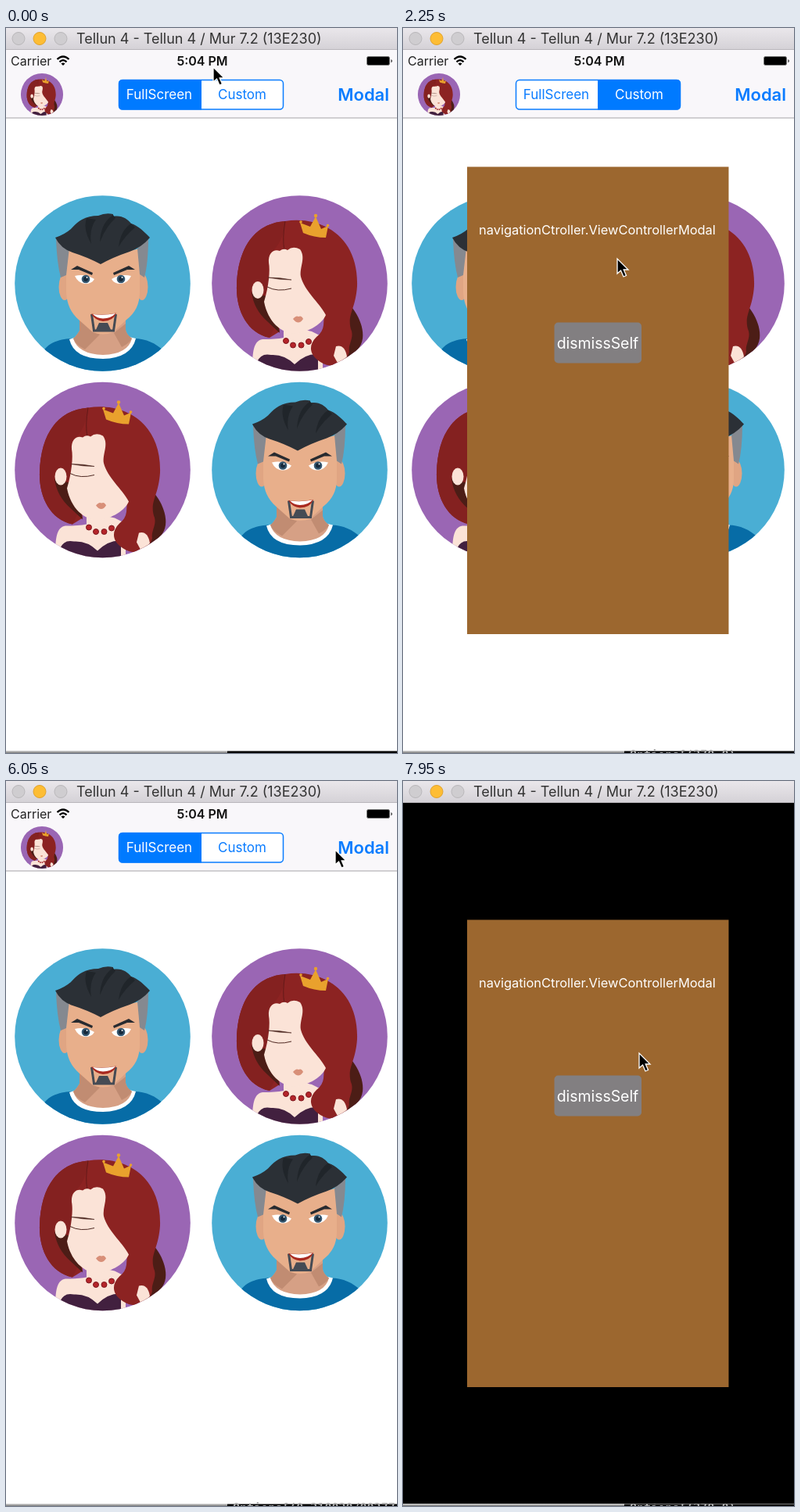
An HTML page for the animation above (8000 ms loop, 500x927 px).

```html
<!DOCTYPE html>
<html lang="en">
<head>
<meta charset="utf-8">
<title>Modal presentation</title>
<style>
html, body { margin: 0; width: 100%; height: 100%; overflow: hidden; background: #fff; }
svg { display: block; width: 100%; height: 100%; }
text { font-family: Inter, Roboto, sans-serif; }
.mid { text-anchor: middle; }
</style>
</head>
<body>
<svg viewBox="0 0 500 927">
  <defs>
    <linearGradient id="chrome" x2="0" y2="1">
      <stop stop-color="#eae7eb"/><stop offset="1" stop-color="#d4d1d6"/>
    </linearGradient>
    <linearGradient id="edge" x2="0" y2="1">
      <stop stop-color="#dedede"/><stop offset="1" stop-color="#777"/>
    </linearGradient>
    <clipPath id="disc"><circle r="112.3"/></clipPath>
    <clipPath id="sheetClip"><rect id="clipRect" y="177.500" height="597.500"/></clipPath>

    <!-- Both portraits are drawn around the centre of their disc. -->
    <g id="man" clip-path="url(#disc)"><g transform="translate(-123.5 -326.5)">
      <rect x="10" y="213" width="228" height="228" fill="#4aaed4"/>
      <path d="M46 416C55 399 75 397 88 397H160C178 396 191 403 201 412V440H46Z" fill="#076ca6"/>
      <path d="M81 398Q87 423 124 423Q160 422 166 397L153 394H94Z" fill="#fff"/>
      <path d="M94 365V387Q90 394 86 397Q92 417 124 418Q156 417 161 397Q154 392 153 386V365Z" fill="#d6a085"/>
      <path d="M94 372V387Q90 394 86 397Q89 405 101 411L120 392Z" fill="#c18c72"/>
      <path d="M153 378L138 390L148 408Q158 403 161 397Q154 392 153 386Z" fill="#c18c72"/>
      <ellipse cx="75" cy="331" rx="7.5" ry="17" fill="#e0a583"/>
      <ellipse cx="174" cy="331" rx="7.5" ry="17" fill="#e0a583"/>
      <path d="M77 282V338Q78 360 93 373L111 389Q124 394 137 389L154 373Q171 360 171 338V282L121 294Z" fill="#e8af8b"/>
      <path d="M64 270L81 281L77 316L70 319Q65 300 64 270ZM182 267L168 282L171 315L177 319Q182 300 182 267Z" fill="#858990"/>
      <path d="M63 268Q75 264 83 257Q91 248 97 245Q106 240 118 240Q127 236 137 238V241C148 239 155 244 160 250C170 253 178 262 184 268Q174 280 158 286Q137 293 121 302Q104 293 85 287Q70 282 63 268Z" fill="#2b3036"/>
      <path d="M103 243Q98 257 109 276Q106 257 115 245ZM137 239Q121 249 120 274Q127 255 140 243ZM160 250Q146 259 144 280Q151 267 165 255Z" fill="#20252a"/>
      <path d="M83 309L91 304L111 313L110 316L93 309ZM165 309L157 304L137 313L138 316L155 309Z" fill="#282b30"/>
      <path d="M88 317Q101 314 113 321Q110 327 101 327Q92 326 88 317ZM160 317Q147 314 135 321Q138 327 147 327Q156 326 160 317Z" fill="#fff"/>
      <g fill="#355770"><circle cx="102" cy="321" r="5.3"/><circle cx="147" cy="321" r="5.3"/></g>
      <g fill="#172a3c"><circle cx="102" cy="321" r="3"/><circle cx="147" cy="321" r="3"/></g>
      <g fill="#fff"><circle cx="103.500" cy="319" r=".9"/><circle cx="148.500" cy="319" r=".9"/></g>
      <path d="M109.500 366L112.500 387H137.500L140.500 366" fill="none" stroke="#454b54" stroke-width="3"/>
      <path d="M119 377H130L135 388H114Z" fill="#454b54"/>
      <path d="M109 365.500Q125 368 141 364.500Q137 375 124 375Q114 374 109 365.500Z" fill="#a92a20"/>
      <path d="M111 366Q125 368 140 365Q134 371.500 124 371.500Q116 371 111 366Z" fill="#fff"/>
    </g></g>

    <g id="woman" clip-path="url(#disc)"><g transform="translate(-375.5 -326.5)">
      <rect x="262" y="213" width="228" height="228" fill="#9a66b4"/>
      <path d="M440 355C448 362 464 390 452 408Q444 420 434 429L405 390Z" fill="#4c1d16"/>
      <path d="M355 380V396Q345 398 328 398C316 400 315 415 315 440H405V395L391 388Z" fill="#fbe3d7"/>
      <path d="M321 440V427Q326 415 339 418Q356 417 369 430Q383 416 399 417V440Z" fill="#42203f"/>
      <path d="M357 247C402 240 451 265 449 330C447 360 436 366 441 385C446 396 437 404 439 414C434 431 418 437 402 427C388 418 386 406 397 395Q405 389 406 380L407 366L380 345L345 348L350 388L337 396C308 390 294 360 295 330C296 285 315 250 357 247Z" fill="#8c2322"/>
      <path d="M357 247C315 250 296 285 295 330C294 360 308 390 337 396L345 380L336 320V290Q355 275 357 247Z" fill="#842120"/>
      <path d="M314 338Q317 360 334 375L350 390L340 345Z" fill="#4c1d16"/>
      <path d="M357 247Q353 270 356 284" fill="none" stroke="#631918"/>
      <path d="M422 407Q433 404 436 420L426 432L419 419Z" fill="#fbe3d7"/>
      <ellipse cx="322" cy="335" rx="7.5" ry="11" fill="#fbe3d7"/>
      <path d="M330 350C336 330 338 310 336 300C335 287 343 282 350 285Q355 281 360 284Q367 278 376 283C384 294 375 306 377 318C382 337 400 350 409 367C403 381 382 390 369 391C352 390 335 376 330 350Z" fill="#fbe3d7"/>
      <path d="M335 319Q351 319 365 322Q350 322 335 319Z" stroke="#4e2922" stroke-width=".6" fill="#4e2922"/>
      <path d="M334 331Q347 338 365 333" fill="none" stroke="#4e2922"/>
      <path d="M367 372Q371 367 374 369Q378 367 380 372Q374 381 367 372Z" fill="#d88f78"/>
      <g fill="#b5252a" stroke="#7c161d"><circle cx="358" cy="400" r="3.5"/><circle cx="367" cy="405.500" r="3.5"/><circle cx="377.500" cy="405.500" r="3.5"/><circle cx="387" cy="401" r="3.5"/></g>
      <path d="M376 249L380 262Q394 268 409 268L412 253L403 257L396 241L389 254Z" fill="#e9a12d"/>
      <g fill="#e9a12d"><circle cx="377" cy="248" r="1.800"/><circle cx="396" cy="240" r="2.200"/><circle cx="411.500" cy="252.500" r="1.800"/></g>
    </g></g>
  </defs>

  <rect width="500" height="927" fill="#fff"/>
  <rect y="924" width="283" height="3" fill="url(#edge)"/>
  <rect x="283" y="924.500" width="217" height="3" fill="#000"/>
  <text id="log" x="290" y="935" font-size="15" font-weight="700" fill="#aaa" style="font-family:'DejaVu Sans Mono',monospace"></text>

  <rect width="500" height="28" fill="url(#chrome)"/>
  <rect y="27" width="500" height="1" fill="#b9b6bb"/>
  <g stroke-width="1">
    <circle cx="16" cy="13.500" r="8" fill="#cfcdd0" stroke="#b9b7ba"/>
    <circle cx="43" cy="13.500" r="8" fill="#fdbd34" stroke="#e0a22c"/>
    <circle cx="70" cy="13.500" r="8" fill="#cfcdd0" stroke="#b9b7ba"/>
  </g>
  <text x="90" y="20" font-size="18" fill="#333">Tellun 4 - Tellun 4 / Mur 7.2 (13E230)</text>

  <g id="screen">
    <rect y="28" width="500" height="87" fill="#f9f7fa"/>
    <rect y="114.500" width="500" height="1" fill="#a5a4a7"/>
    <text x="6" y="48" font-size="16" fill="#222">Carrier</text>
    <g fill="none" stroke="#000" stroke-width="2.3">
      <path d="M65.500 40Q73 33 80.500 40M68.500 43.300Q73 39 77.500 43.300"/>
      <path d="M70.500 45.500Q73 43.500 75.500 45.500L73 48Z" fill="#000" stroke="none"/>
    </g>
    <text class="mid" x="251" y="48" font-size="16" font-weight="600" fill="#111">5:04 PM</text>
    <rect x="461.500" y="36.500" width="29" height="11" rx="2" fill="#000" stroke="#777"/>
    <path d="M492.500 40q2.500 2 0 4.500Z" fill="#000"/>
    <use href="#woman" transform="translate(46 85) scale(.241)"/>

    <rect x="144.500" y="66.500" width="210" height="37.500" rx="4.500" fill="#fff" stroke="#0a7cff" stroke-width="1.5"/>
    <path id="segment" fill="#007aff"/>
    <text id="fullLabel" class="mid" x="196" y="90.500" font-size="17">FullScreen</text>
    <text id="customLabel" class="mid" x="302" y="90.500" font-size="17">Custom</text>
    <text id="modalButton" x="490" y="93" font-size="22" font-weight="600" fill="#0a7cff" text-anchor="end">Modal</text>

    <use href="#man" x="123.500" y="326.500"/>
    <use href="#woman" x="375.500" y="326.500"/>
    <use href="#woman" x="123.500" y="565"/>
    <use href="#man" x="375.500" y="565"/>
  </g>
  <rect id="blackout" y="28" width="500" height="896"/>

  <g id="sheet" clip-path="url(#sheetClip)">
    <rect x="82" y="177" width="335" height="598" fill="#9c672f"/>
    <text id="sheetLabel" class="mid" y="6" font-size="16.400" fill="#fff">navigationCtroller.ViewControllerModal</text>
    <g id="dismiss">
      <rect x="193.500" y="376.500" width="111.500" height="52" rx="5" fill="#827f81"/>
      <text class="mid" x="249" y="410" font-size="19.400" fill="#fff">dismissSelf</text>
    </g>
  </g>
  <path id="cursor" d="M0 0V19L4.500 15L8 23L11.500 21.500L8.200 14H14Z" fill="#000" stroke="#fff" stroke-width="1.3"/>
</svg>
<script>
const LOOP = 8000, CUSTOM_AT = 450, FULL_AT = 4800;
const OPEN_1 = 1300, CLOSE_1 = 2900, OPEN_2 = 6423, DURATION = 300;

// time, x, y of the pointer's resting points
const path = [
  [0, 265, 50], [300, 300, 84], [500, 300, 84], [950, 469, 88], [1650, 469, 88],
  [2250, 274, 295], [2650, 250, 398], [3450, 250, 398], [4350, 210, 62],
  [4600, 200, 84], [5100, 200, 84], [5850, 421, 88], [6900, 421, 88],
  [7700, 302, 348], [LOOP, 302, 348]
];

const el = id => document.getElementById(id);
const set = (id, attrs) => Object.entries(attrs).forEach(([k, v]) => el(id).setAttribute(k, v));
const clamp = v => Math.max(0, Math.min(1, v));
const ease = v => { v = clamp(v); return v * v * (3 - 2 * v); };
const progress = (t, start) => ease((t - start) / DURATION);

function pointerAt(t) {
  const i = path.findIndex(p => p[0] > t);
  const [t0, x0, y0] = path[i - 1], [t1, x1, y1] = path[i];
  const k = ease((t - t0) / (t1 - t0));
  return [x0 + (x1 - x0) * k, y0 + (y1 - y0) * k];
}

function drawSegments(custom) {
  set('segment', { d: custom
    ? 'M249 66H350Q355 66 355 71V99Q355 104.500 350 104.500H249Z'
    : 'M250 66H149Q144 66 144 71V99Q144 104.500 149 104.500H250Z' });
  set('fullLabel', { fill: custom ? '#0a7cff' : '#fff' });
  set('customLabel', { fill: custom ? '#fff' : '#0a7cff' });
}

function drawSheet(t) {
  const open = t < OPEN_2
    ? progress(t, OPEN_1) - progress(t, CLOSE_1)
    : progress(t, OPEN_2);
  const width = 334.5 * open, left = 249.2 - width / 2;
  set('sheet', { visibility: open > 0 ? 'visible' : 'hidden' });
  set('clipRect', { x: left, width });
  const labelX = left + 166.5 * open - 14 * (1 - open);
  set('sheetLabel', { transform:
    `translate(${labelX} ${258 + 8 * (1 - open)}) scale(${open ** 1.4})` });
  set('dismiss', { opacity: clamp((open - .85) / .15) });
}

function draw(t) {
  drawSegments(t >= CUSTOM_AT && t < FULL_AT);
  drawSheet(t);
  set('blackout', { visibility: t >= OPEN_2 + DURATION ? 'visible' : 'hidden' });
  const tapped = [OPEN_1, OPEN_2].map(s => t - s + 80).find(d => d >= 0 && d < 350);
  set('modalButton', { opacity: tapped === undefined ? 1 : .3 + .7 * tapped / 350 });

  const showing = t < CLOSE_1 + DURATION || t >= OPEN_2 + DURATION;
  el('log').textContent = t < OPEN_1 + DURATION ? ''
    : showing ? 'Options[(270_0)' : 'Options[(0_210020/00277)';
  set('cursor', { transform: `translate(${pointerAt(t)})` });
}

function tick() {
  draw(performance.now() % LOOP);
  requestAnimationFrame(tick);
}
tick();
</script>
</body>
</html>
```
